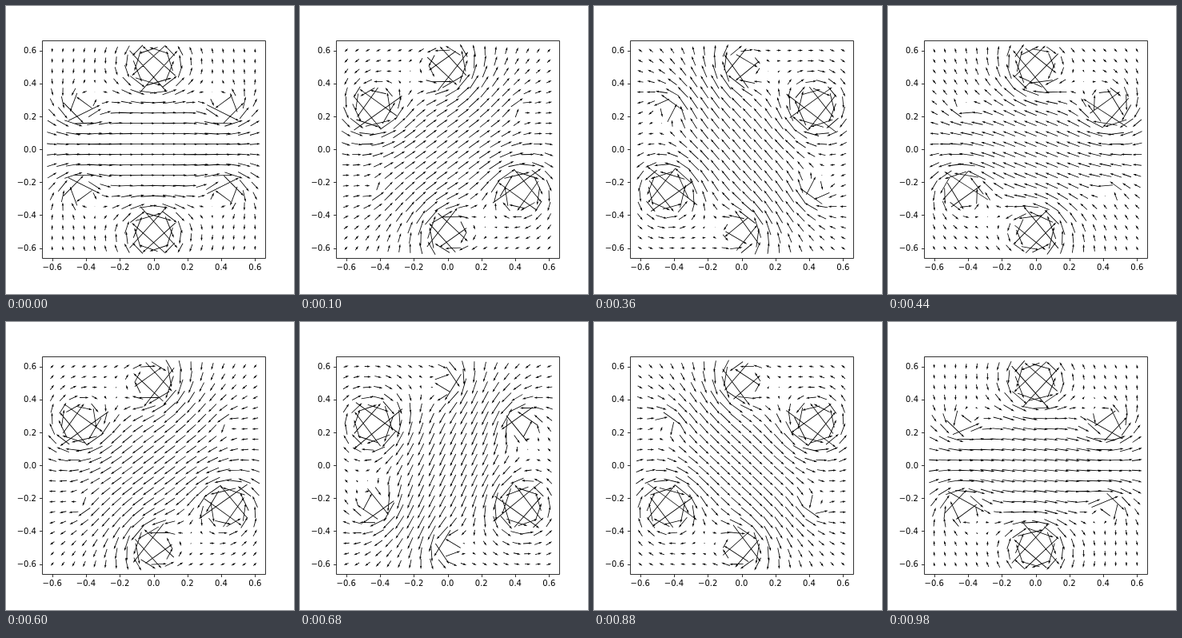
An HTML page for the animation above (1000 ms loop, 360x360 px).

```html
<!DOCTYPE html>
<html lang="en">
<head>
<meta charset="utf-8">
<title>Rotating magnetic field</title>
<style>
  html, body { margin: 0; width: 100%; height: 100%; overflow: hidden; background: #fff; }
  svg { display: block; width: 360px; height: 360px; }
  text { font: 10px "DejaVu Sans", sans-serif; }
  #axes { fill: none; stroke: #000; stroke-width: .8; }
</style>
</head>
<body>
<svg viewBox="0 0 360 360">
  <path id="arrows"/>
  <path id="axes"/>
  <g id="labels"></g>
</svg>
<script>
const $ = id => document.getElementById(id);
const px = x => 184.5 + x * 279 / 1.32;
const py = y => 179.1 - y * 271.8 / 1.32;
const snap = v => Math.floor(v + .5) + .5;

// Frame, ticks and tick labels
let axes = 'M45.5 43.5H324.5V315.5H45.5Z', labels = '';
for (let i = -3; i <= 3; i++) {
  const v = i / 5, x = px(v), y = py(v);
  const text = (i < 0 ? '\u2212' : '') + Math.abs(v).toFixed(1);
  axes += `M${snap(x)} 315.5v3.5M45.5 ${snap(y)}h-3.5`;
  labels += `<text x="${x}" y="330" text-anchor="middle">${text}</text>` +
            `<text x="38" y="${Math.round(y + 3.6)}" text-anchor="end">${text}</text>`;
}
$('axes').setAttribute('d', axes);
$('labels').innerHTML = labels;

// Six wires on a circle carry currents that form a turning sine wave
const N = 20, SCALE = 2.79, W = .837;
const wires = [30, 90, 150, 210, 270, 330].map(deg => {
  const a = deg * Math.PI / 180;
  return { a, x: .5 * Math.cos(a), y: .5 * Math.sin(a) };
});

function field(x, y, phase) {
  let u = 0, v = 0;
  for (const w of wires) {
    const dx = x - w.x, dy = y - w.y;
    const k = Math.sin(w.a - phase) / (dx * dx + dy * dy);
    u -= k * dy;
    v += k * dx;
  }
  return [u, v];
}

// Arrow centred on (x, y); short ones shrink as a whole
function arrow(x, y, u, v) {
  const size = Math.hypot(u, v) || 1e-9, c = u / size, s = -v / size;
  let len = size * SCALE / W, k = W, shape;
  if (len < 1) {
    shape = [0, 1, 2, 3, 4, 5].map(i =>
      [.5 * Math.cos(i * Math.PI / 3), .5 * Math.sin(i * Math.PI / 3)]);
  } else {
    if (len < 5) {
      k *= len / 5;
      len = 5;
    }
    const h = len / 2;
    shape = [[-h, -.5], [h - 4.5, -.5], [h - 5, -1.5], [h, 0],
             [h - 5, 1.5], [h - 4.5, .5], [-h, .5]];
  }
  return 'M' + shape.map(([a, b]) =>
    (x + k * (a * c - b * s)).toFixed(2) + ' ' +
    (y + k * (a * s + b * c)).toFixed(2)).join('L') + 'Z';
}

function draw(now) {
  const step = Math.floor(now / 20 + 1e-6) % 50;
  const phase = step / 50 * 2 * Math.PI;
  let d = '';
  for (let j = 0; j < N; j++) {
    for (let i = 0; i < N; i++) {
      const x = -.6 + 1.2 * i / (N - 1), y = -.6 + 1.2 * j / (N - 1);
      d += arrow(px(x), py(y), ...field(x, y, phase));
    }
  }
  $('arrows').setAttribute('d', d);
}

function loop(now) {
  draw(now);
  requestAnimationFrame(loop);
}
draw(0);
requestAnimationFrame(loop);
</script>
</body>
</html>
```
